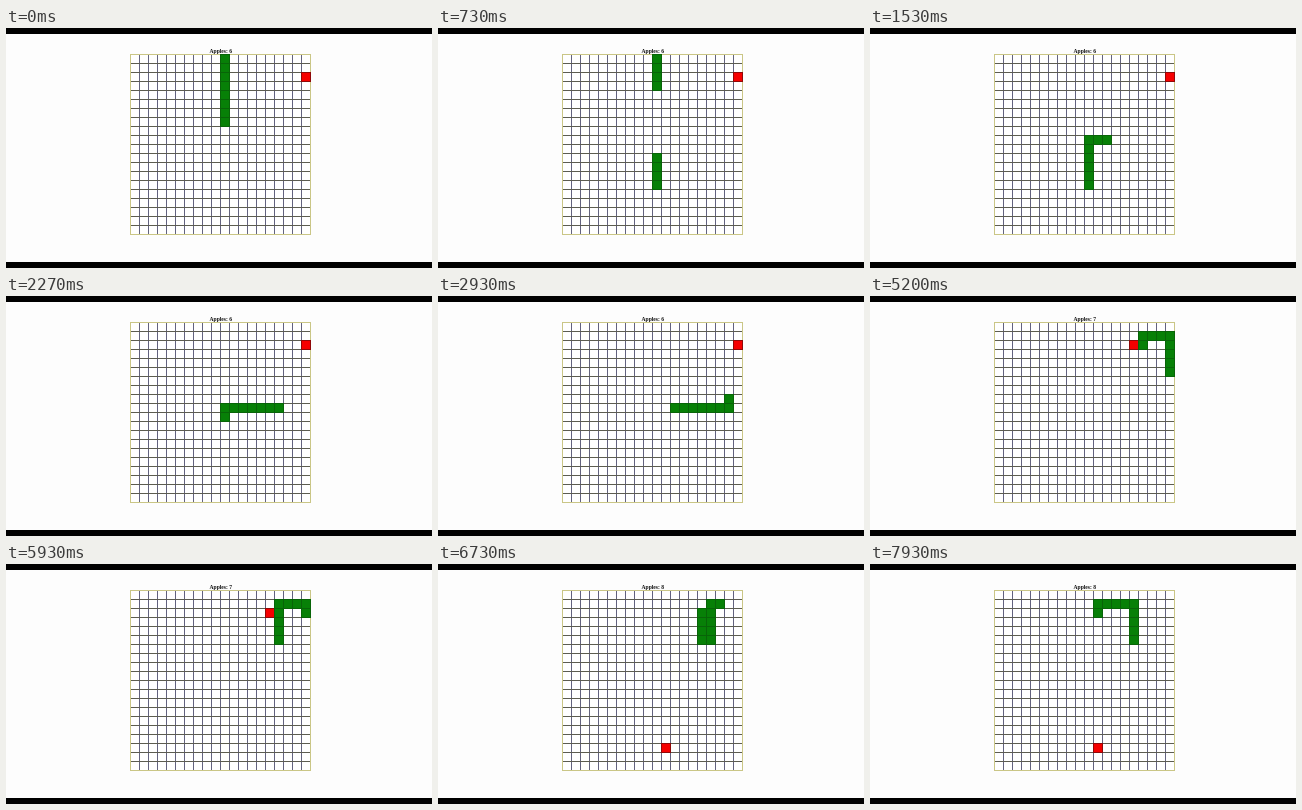
Recreate the animation shown at these times as an HTML page with a canvas. Size 426x240 px, loop 8000 ms.

```html
<!DOCTYPE html>
<html lang="en">
<head>
<meta charset="utf-8">
<title>Snake</title>
<style>
  html, body { margin: 0; width: 100%; height: 100%; overflow: hidden; background: #000; }
  canvas { display: block; width: 426px; height: 240px; }
</style>
</head>
<body>
<canvas id="stage" width="426" height="240"></canvas>
<script>
const ctx = document.getElementById('stage').getContext('2d');

const LOOP = 8000, FPS = 15;
const FIRST_MOVE = 45, MOVE_TIME = 198;
const CELLS = 20, LEFT = 124, TOP = 26, PITCH = 9, SIZE = CELLS * PITCH;
const START_LENGTH = 8, START_SCORE = 6, ENTRY_ROW = 14;

const APPLES = [[19, 2], [15, 2], [11, 17]];
const ROUTE = 'U6 R8 U4 R1 U4 L3 D4 L1 U4 L4 D1';
const STEP = { U: [0, -1], D: [0, 1], L: [-1, 0], R: [1, 0] };

// Every cell the head visits, oldest first.
const trail = Array.from({ length: START_LENGTH }, (_, i) => [10, 7 - i]);
for (const leg of ROUTE.split(' ')) {
  const [dx, dy] = STEP[leg[0]];
  for (let i = 0; i < Number(leg.slice(1)); i++) {
    const [x, y] = trail[trail.length - 1];
    trail.push([x + dx, y + dy < 0 ? ENTRY_ROW : y + dy]);
  }
}

function rect(color, x, y, w, h) {
  ctx.fillStyle = color;
  ctx.fillRect(x, y, w, h);
}

function drawGrid() {
  rect('#ffffff', LEFT, TOP, SIZE, SIZE);
  for (let i = PITCH; i < SIZE; i += PITCH) rect('#62627e', LEFT + i, TOP, 1, SIZE);
  for (let i = PITCH; i < SIZE; i += PITCH) rect('#5c5c50', LEFT, TOP + i, SIZE, 1);
  ctx.strokeStyle = '#cac686';
  ctx.lineWidth = 1;
  ctx.strokeRect(LEFT + 0.5, TOP + 0.5, SIZE, SIZE);
}

// Cells share their border lines with their neighbours.
function drawCell([col, row], fill, line) {
  const x = LEFT + col * PITCH, y = TOP + row * PITCH;
  rect(line, x, y, PITCH + 1, PITCH + 1);
  rect(fill, x + 1, y + 1, PITCH - 1, PITCH - 1);
}

function draw(time) {
  const moves = Math.max(0, Math.floor((time - FIRST_MOVE) / MOVE_TIME) + 1);
  const end = Math.min(trail.length, START_LENGTH + moves);

  let eaten = 0;
  for (let i = START_LENGTH; i < end; i++) {
    const [x, y] = APPLES[eaten];
    if (trail[i][0] === x && trail[i][1] === y) eaten++;
  }

  rect('#000000', 0, 0, 426, 240);
  rect('#fdfdfd', 0, 6, 426, 228);
  drawGrid();
  drawCell(APPLES[eaten], '#f60000', '#900808');
  trail.slice(end - START_LENGTH - eaten, end)
    .forEach(cell => drawCell(cell, '#078007', '#086408'));

  ctx.fillStyle = '#111111';
  ctx.font = 'bold 5.6px "Liberation Serif", serif';
  ctx.textAlign = 'center';
  ctx.fillText('Apples: ' + (START_SCORE + eaten), 214.8, 25);
}

const start = performance.now();
function tick() {
  const time = (performance.now() - start) % LOOP;
  draw(Math.floor((time + 5) * FPS / 1000) * 1000 / FPS);
  requestAnimationFrame(tick);
}
tick();
</script>
</body>
</html>
```
